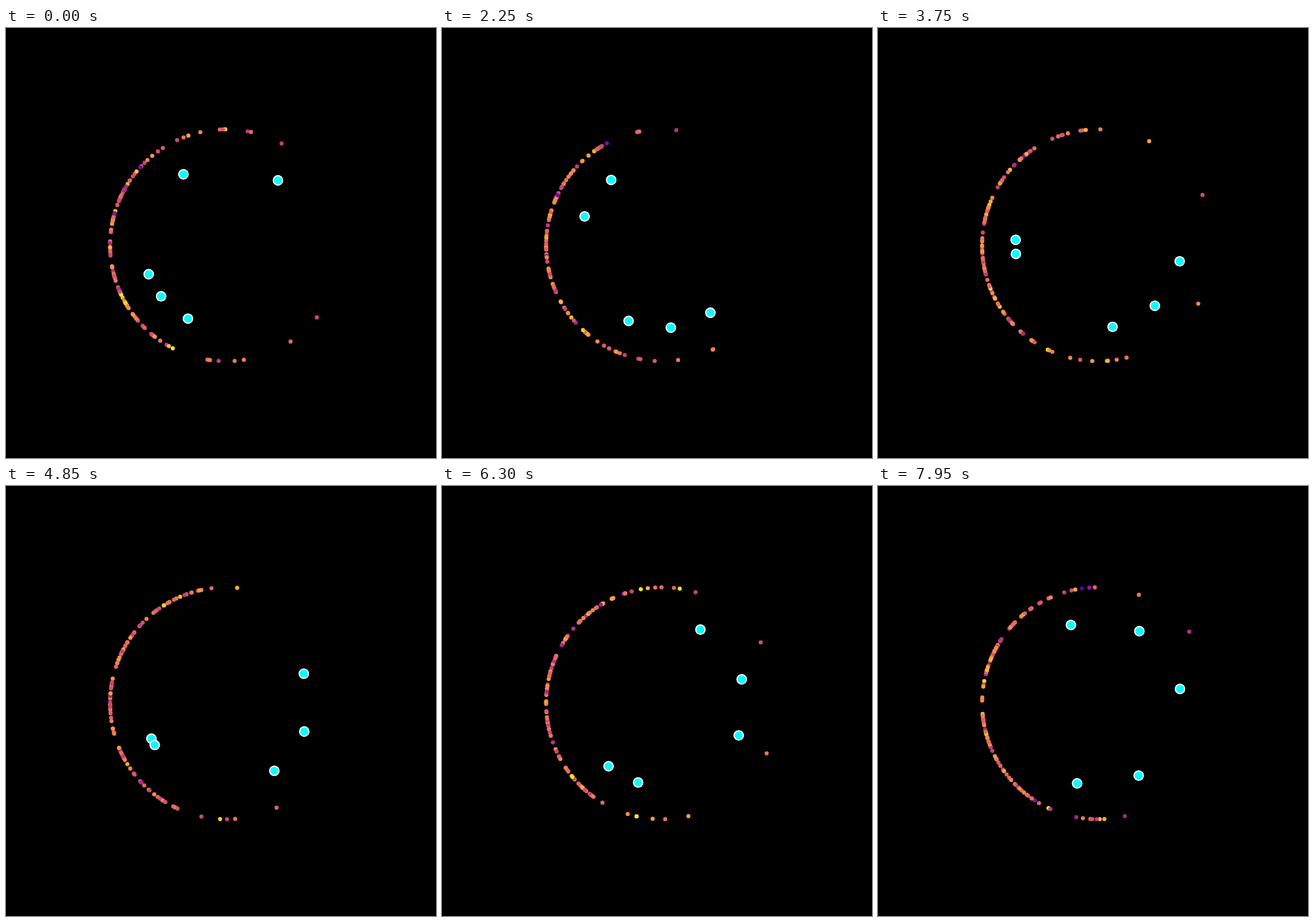
These frames come from a looping animation (748 px wide and 748 px high, 8 s). An HTML page with a canvas:

```html
<!DOCTYPE html>
<html lang="en">
<head>
<meta charset="utf-8">
<title>Orbiting dots</title>
<style>
  html, body { margin: 0; width: 100%; height: 100%; overflow: hidden; background: #000; }
  canvas { display: block; width: 748px; height: 748px; }
</style>
</head>
<body>
<canvas id="stage" width="748" height="748"></canvas>
<script>
const ctx = document.getElementById('stage').getContext('2d');
const LOOP = 8000, STEP = 50, TAU = Math.PI * 2;
const RING = { x: 382.8, y: 377.9, r: 201.7, count: 120, spread: 0.8 };
const ORBIT = { x: 383.3, y: 377.8, r: 144.2 };

// Degrees, counter-clockwise: start angle, speed per second, acceleration, slow sway.
const ORBITERS = [
  { start: 121.2, speed: 17.8, bend: -0.12, sway: -1 },
  { start: 51.5, speed: 35.2, bend: -0.51, sway: 0 },
  { start: 200.5, speed: 21.3, bend: 0, sway: -2.5 },
  { start: 218.1, speed: 25.05, bend: 0.05, sway: 1.2 },
  { start: 242.4, speed: 28.3, bend: 0.03, sway: -0.8 }
];

const PLASMA = [[13, 8, 135], [126, 3, 168], [204, 71, 120], [248, 149, 64], [240, 249, 33]];

function plasma(value) {
  const pos = Math.min(0.95, Math.max(0, value)) * (PLASMA.length - 1);
  const i = Math.floor(pos);
  const mix = PLASMA[i].map((c, k) => Math.round(c + (PLASMA[i + 1][k] - c) * (pos - i)));
  return `rgb(${mix})`;
}

function randomSource(seed) {
  let a = seed;
  return () => {
    a = (a + 0x6D2B79F5) | 0;
    let t = Math.imul(a ^ (a >>> 15), 1 | a);
    t = (t + Math.imul(t ^ (t >>> 7), 61 | t)) ^ t;
    return ((t ^ (t >>> 14)) >>> 0) / 4294967296;
  };
}

const normal = rand => Math.sqrt(-2 * Math.log(1 - rand())) * Math.cos(TAU * rand());

function orbitAngle({ start, speed, bend, sway }, ms) {
  const t = ms / 1000;
  const degrees = start + speed * t + bend * t * t + sway * Math.sin(TAU * ms / LOOP);
  return degrees * Math.PI / 180;
}

function dot(circle, angle, radius, fill) {
  ctx.fillStyle = fill;
  ctx.beginPath();
  ctx.arc(circle.x + circle.r * Math.cos(angle), circle.y - circle.r * Math.sin(angle), radius, 0, TAU);
  ctx.fill();
}

function draw(step) {
  ctx.fillStyle = '#000';
  ctx.fillRect(0, 0, 748, 748);

  // The ring is sampled afresh at every step, clustered around its left side.
  const rand = randomSource(step * 7919 + 17);
  for (let i = 0; i < RING.count; i++) {
    const angle = Math.PI + RING.spread * normal(rand);
    dot(RING, angle, 3.6, plasma(0.63 + 0.14 * normal(rand)));
  }

  for (const orbiter of ORBITERS) {
    const angle = orbitAngle(orbiter, step * STEP);
    dot(ORBIT, angle, 9.2, '#fff');
    dot(ORBIT, angle, 7, '#0ff');
  }
}

const start = performance.now();
let shown = -1;
function tick() {
  const step = Math.floor(((performance.now() - start) % LOOP) / STEP);
  if (step !== shown) draw(shown = step);
  requestAnimationFrame(tick);
}
tick();
</script>
</body>
</html>
```
